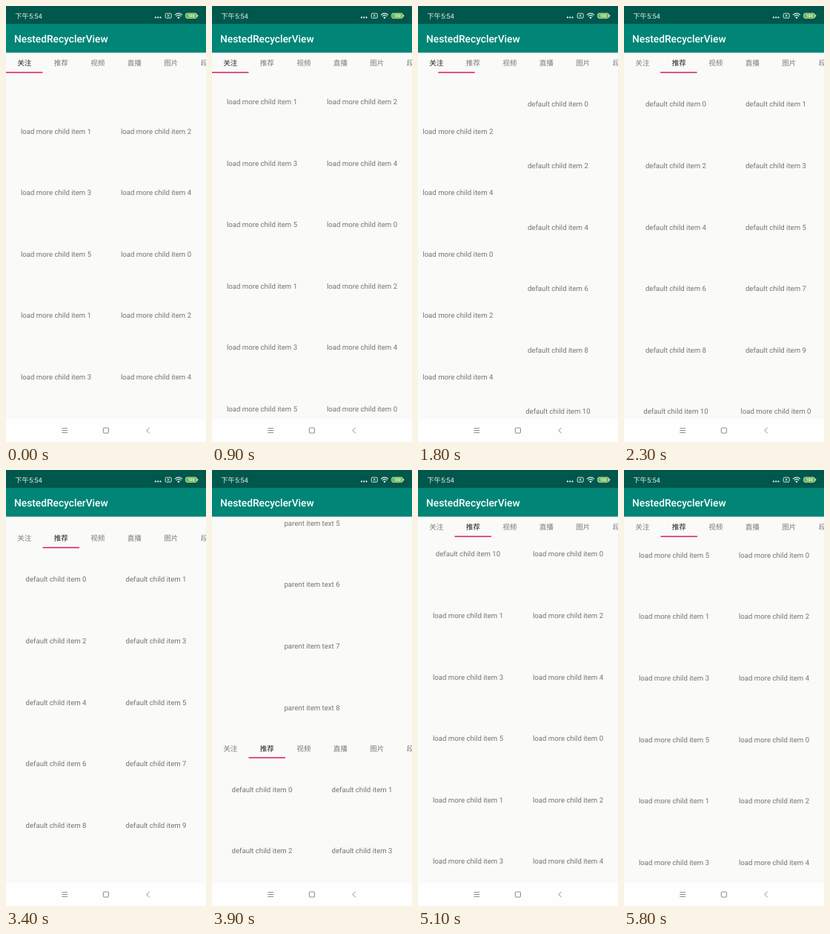
These frames come from a looping animation (270x586 px, 5900 ms). An HTML page:

```html
<!DOCTYPE html>
<html lang="zh-CN">
<head>
<meta charset="utf-8">
<title>NestedRecyclerView</title>
<style>
  html, body { margin: 0; width: 100%; height: 100%; overflow: hidden; background: #fafaf8; }
  svg { display: block; width: 100%; height: 100%; }
  text {
    font-family: Roboto, "Noto Sans CJK SC", "Noto Sans CJK", sans-serif;
    font-size: 9.63px;
    text-rendering: geometricPrecision;
  }
  .row { fill: #757575; text-anchor: middle; }
  .tab { fill: #7c7c7c; text-anchor: middle; }
  .tab.on { fill: #212121; }
</style>
</head>
<body>
<svg viewBox="0 0 270 586">
  <rect width="270" height="586" fill="#fafaf8"/>
  <g id="pageA"></g>
  <g id="pageB"></g>
  <g id="top">
    <rect y="-530" width="270" height="620.2" fill="#fafaf8"/>
    <g id="parents"></g>
    <g id="tabs"></g>
    <rect id="mark" y="88.6" width="49.5" height="1.5" fill="#d81b60"/>
  </g>

  <rect width="270" height="24" fill="#00574b"/>
  <rect y="24" width="270" height="38.7" fill="#008577"/>
  <text x="11" y="48.8" fill="#fff" style="font-size:13.75px;font-weight:500">NestedRecyclerView</text>

  <g id="status" fill="#e8f1ef">
    <text x="12.3" y="16.5" style="font-size:9.3px">下午5:54</text>
    <circle cx="201.9" cy="15.4" r="1.1"/>
    <circle cx="205.2" cy="15.4" r="1.1"/>
    <circle cx="208.5" cy="15.4" r="1.1"/>
    <g fill="none" stroke="#e8f1ef" stroke-width=".9">
      <rect x="215.2" y="10" width="8" height="6.2" rx="1.2"/>
      <path d="M217.7 11.6l3 3m0-3l-3 3"/>
      <path d="M228 12.1q5-4.6 10 0M229.7 13.9q3.3-3 6.6 0" stroke-width="1.1"/>
    </g>
    <path d="M231.2 15.3q1.8-1.5 3.6 0l-1.8 1.9z"/>
    <rect x="242.3" y="9.5" width="15.6" height="7.2" rx="2.6"/>
    <rect x="258.2" y="11.7" width="1" height="2.8" rx=".5"/>
    <rect x="243" y="10.2" width="14.2" height="5.8" rx="2" fill="#5fb83c"/>
    <text x="250.1" y="15.1" text-anchor="middle" fill="#fff" style="font-size:5.4px;font-weight:700">100</text>
  </g>

  <rect y="555" width="270" height="31" fill="#fefefe"/>
  <g fill="none" stroke="#7d7d7d" stroke-width=".9">
    <path d="M75.3 567.6h7.8M75.3 570.5h7.8M75.3 573.4h7.8"/>
    <rect x="131.3" y="567" width="7.2" height="7" rx="1"/>
    <path d="M193.7 566.8l-3.9 3.7 3.9 3.7"/>
  </g>
</svg>
<script>
const LOOP = 5900, TICK = 100;
const ROW = 82.6, FIRST = 135.4, TAB = 49.5, WIDTH = 270;
const $ = id => document.getElementById(id);

function addText(parent, x, y, label, cls) {
  const el = document.createElementNS("http://www.w3.org/2000/svg", "text");
  el.setAttribute("x", x);
  el.setAttribute("y", y);
  el.setAttribute("class", cls);
  el.textContent = label;
  parent.appendChild(el);
  return el;
}

function fillPage(page) {
  for (let i = 0; i < 34; i++) {
    const label = i < 11 ? `default child item ${i}` : `load more child item ${(i - 11) % 6}`;
    addText(page, i % 2 ? 202.5 : 67.5, FIRST + ROW * (i >> 1), label, "row");
  }
}

fillPage($("pageA"));
fillPage($("pageB"));
for (let k = 3; k <= 8; k++)
  addText($("parents"), 135, FIRST - 27.5 - ROW * (9 - k), `parent item text ${k}`, "row");
const tabs = ["关注", "推荐", "视频", "直播", "图片", "段子"].map((label, i) =>
  addText($("tabs"), TAB * (i + 0.5), 80.4, label, "tab"));

// Smooth curve through [time, value] keys that never overshoots.
function curve(keys) {
  const slope = i => (keys[i + 1][1] - keys[i][1]) / (keys[i + 1][0] - keys[i][0]);
  const tangent = keys.map((_, i) => {
    if (i === 0 || i === keys.length - 1) return 0;
    const a = slope(i - 1), b = slope(i);
    return a * b > 0 ? 2 * a * b / (a + b) : 0;
  });
  return t => {
    if (t <= keys[0][0]) return keys[0][1];
    const n = keys.findIndex(k => k[0] >= t);
    if (n < 0) return keys[keys.length - 1][1];
    const [t0, v0] = keys[n - 1], [t1, v1] = keys[n];
    const h = t1 - t0, u = (t - t0) / h, w = 1 - u;
    return v0 * w * w * (1 + 2 * u) + v1 * u * u * (3 - 2 * u)
      + h * u * w * (tangent[n - 1] * w - tangent[n] * u);
  };
}

const fling = curve([[800, 0], [900, 39.5], [1000, 122], [1100, 205], [1200, 239], [1300, 247.1], [1400, 3 * ROW]]);
const swipe = curve([[1400, 0], [1500, 14], [1700, 98], [1900, 196], [2000, 228], [2100, 250], [2300, 267.6], [2600, WIDTH]]);
// Negative values uncover the parent list, positive ones scroll the child list.
const scroll = curve([
  [3300, 0], [3400, -15], [3600, -140], [3800, -262], [3900, -297.3], [4200, -330],
  [4400, -270], [4500, -130], [4600, 30], [4700, 150.1], [4800, 238], [5100, 431.9],
  [5300, 548], [5500, 637], [5700, 677.5], [5800, 678.3]
]);

const move = (el, x, y) => el.setAttribute("transform", `translate(${x.toFixed(2)} ${y.toFixed(2)})`);

function draw(time) {
  const t = Math.floor(time % LOOP / TICK) * TICK;
  const page = swipe(t), y = scroll(t);
  move($("pageA"), -page, -459.4 - fling(t));
  move($("pageB"), WIDTH - page, -y);
  move($("top"), 0, Math.max(0, -y));
  $("mark").setAttribute("x", TAB * page / WIDTH);
  const active = t < 1900 ? 0 : 1;
  tabs.forEach((el, i) => el.classList.toggle("on", i === active));
}

const start = performance.now();
function frame() {
  draw(performance.now() - start);
  requestAnimationFrame(frame);
}
frame();
</script>
</body>
</html>
```
